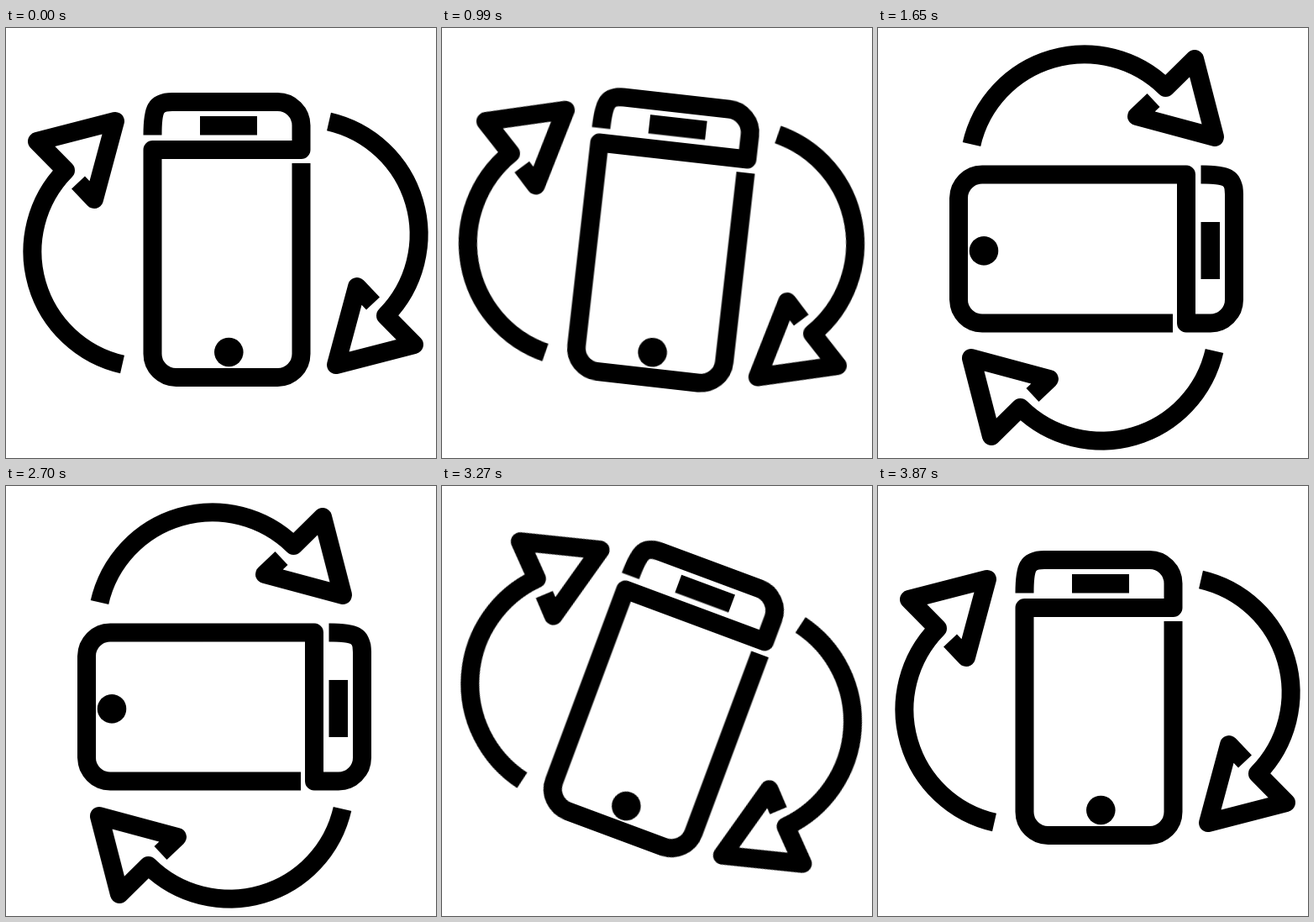
Animation of 512 by 512 pixels, one loop 4.38 s. Source, as an HTML page:

```html
<!DOCTYPE html>
<html lang="en">
<head>
<meta charset="utf-8">
<title>Rotate phone</title>
<style>
  html, body { margin: 0; width: 100%; height: 100%; overflow: hidden; background: #fff; }
  svg { display: block; width: 100%; height: 100%; }
  #icon { transform-origin: 256px 256px; }
  .line { fill: none; stroke: #000; stroke-width: 22; stroke-linejoin: round; }
</style>
</head>
<body>
<svg viewBox="0 0 512 512">
  <g id="icon">
    <path class="line" d="M174.5 127.5C174.5 96 178 88 198 88H323.5a28 28 0 0 1 28 28V145H174.5V388a28 28 0 0 0 28 28H323.5a28 28 0 0 0 28-28V161"/>
    <rect x="231" y="105" width="68" height="22.5"/>
    <circle cx="265.3" cy="386" r="17.3"/>
    <path id="arrow" class="line" d="M138.5 400.5A137.8 137.8 0 0 1 71 169.5L37 135L130 111L105 204L86 184"/>
    <use href="#arrow" transform="rotate(180 261.5 256)"/>
  </g>
</svg>
<script>
  const LOOP = 4380;
  // time in ms, angle in degrees, easing towards the next step
  const steps = [
    [0, 0, 'linear'],
    [534, 0, 'cubic-bezier(1, 0, .916, 1)'],
    [1650, 90, 'linear'],
    [2690, 90, 'cubic-bezier(.52, 0, .143, 1)'],
    [3860, 0, 'linear'],
    [LOOP, 0, 'linear']
  ];
  const frames = steps.map(([time, angle, easing]) => ({
    offset: time / LOOP,
    transform: `rotate(${angle}deg)`,
    easing
  }));
  document.getElementById('icon').animate(frames, { duration: LOOP, iterations: Infinity });
</script>
</body>
</html>
```
